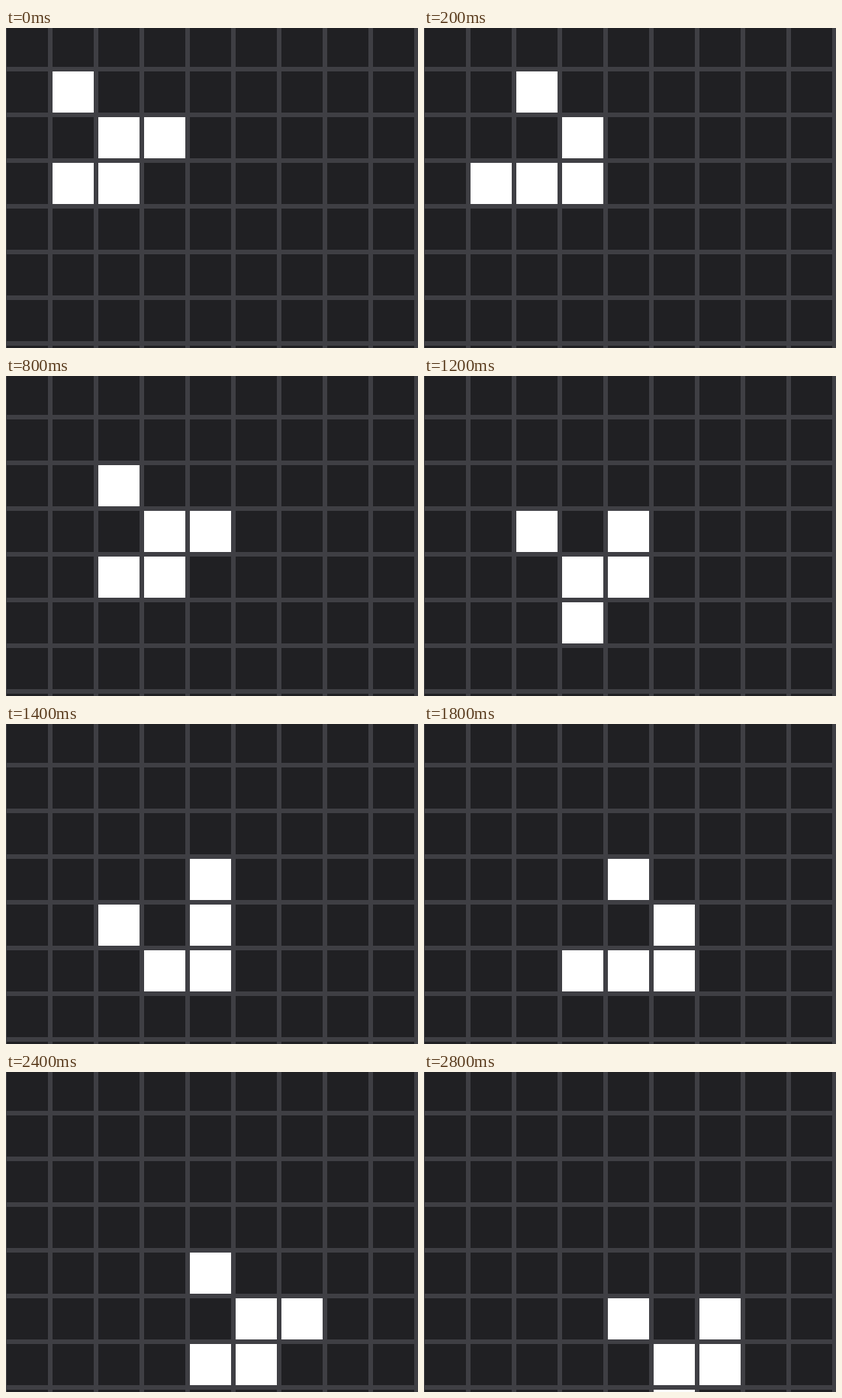
Write an HTML page with a canvas that moves like this. It is 540 px wide and 420 px high and loops after 3000 ms.

```html
<!DOCTYPE html>
<html lang="en">
<head>
<meta charset="utf-8">
<title>Glider</title>
<style>
  html, body { margin: 0; width: 100%; height: 100%; overflow: hidden; background: #3f3f44; }
  canvas { display: block; }
</style>
</head>
<body>
<canvas width="540" height="420"></canvas>
<script>
const canvas = document.querySelector('canvas');
const ctx = canvas.getContext('2d');
const SIZE = 9, PITCH = 60, CELL = 54;
const STEP_MS = 200, STEPS = 15;
const LINE = '#3f3f44', DEAD = '#202023', ALIVE = '#fff';

const seed = [
  '    ',
  ' #  ',
  '  ##',
  ' ## ',
];

const makeGrid = isAlive =>
  Array.from({ length: SIZE }, (_, row) =>
    Array.from({ length: SIZE }, (_, col) => isAlive(row, col)));

function countNeighbours(grid, row, col) {
  let count = 0;
  for (let dy = -1; dy <= 1; dy++)
    for (let dx = -1; dx <= 1; dx++)
      if ((dx || dy) && grid[row + dy]?.[col + dx]) count++;
  return count;
}

// Conway's Game of Life: born with 3 neighbours, survives with 2 or 3.
const evolve = grid => makeGrid((row, col) => {
  const count = countNeighbours(grid, row, col);
  return count === 3 || (count === 2 && grid[row][col]);
});

const generations = [makeGrid((row, col) => seed[row]?.[col] === '#')];
while (generations.length < STEPS) generations.push(evolve(generations.at(-1)));

function draw(grid) {
  ctx.fillStyle = LINE;
  ctx.fillRect(0, 0, canvas.width, canvas.height);
  grid.forEach((cells, row) => cells.forEach((alive, col) => {
    ctx.fillStyle = alive ? ALIVE : DEAD;
    ctx.fillRect(col * PITCH + 1, row * PITCH - 3, CELL, CELL);
  }));
}

const start = performance.now();
function tick() {
  const step = Math.floor((performance.now() - start) / STEP_MS) % STEPS;
  draw(generations[step]);
  requestAnimationFrame(tick);
}
tick();
</script>
</body>
</html>
```
